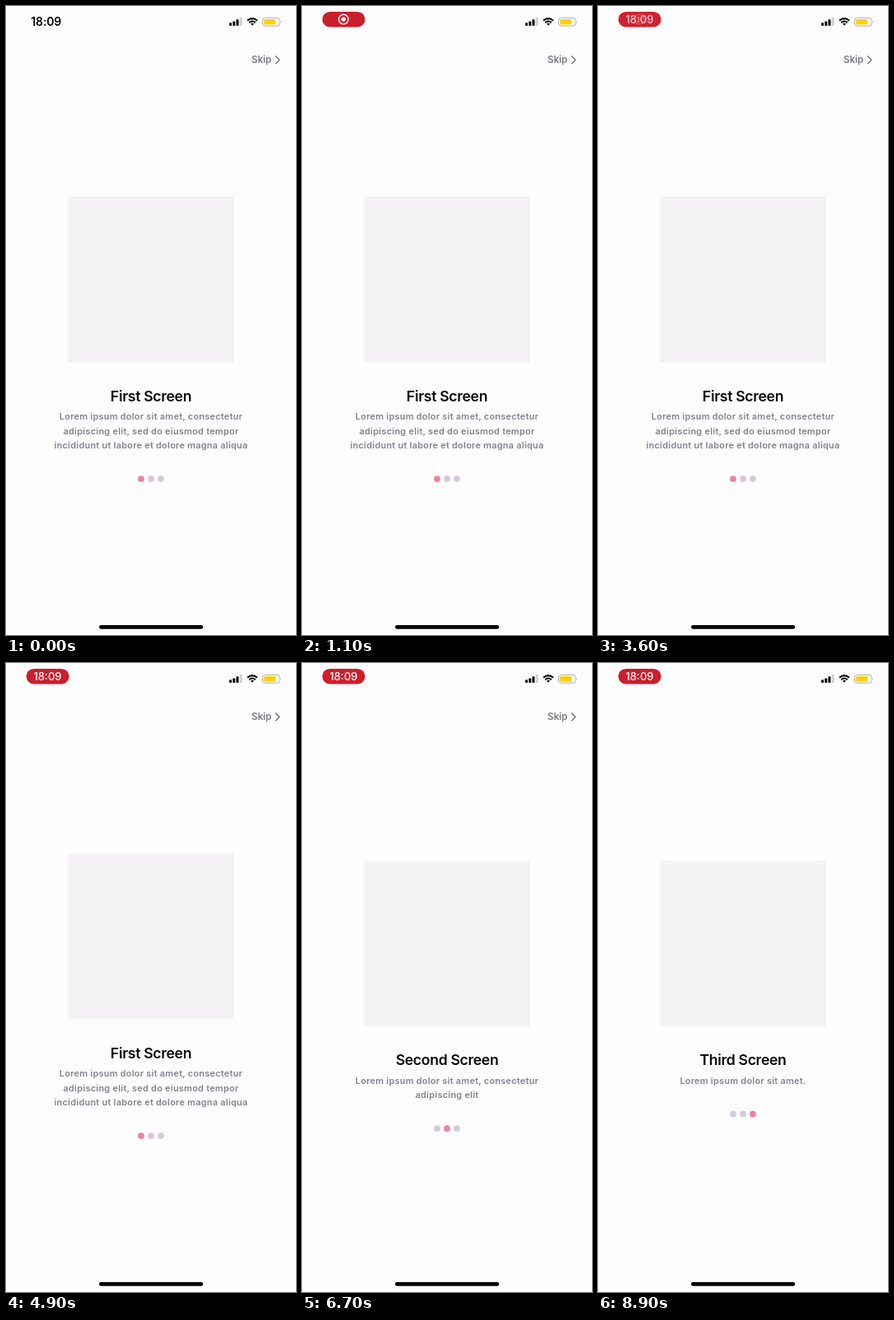
Write an HTML page that moves like this. It is 352 px wide and 762 px high and loops after 9100 ms.

```html
<!DOCTYPE html>
<html lang="en">
<head>
<meta charset="utf-8">
<title>Onboarding</title>
<style>
  html, body { margin: 0; width: 100%; height: 100%; overflow: hidden; background: #fefdfe; }
  svg { display: block; width: 352px; height: 762px; font-family: Inter, sans-serif; }
  .title { font-size: 17.6px; font-weight: 600; letter-spacing: -.32px; fill: #09090c; }
  .body { font-size: 10.9px; font-weight: 600; letter-spacing: .27px; fill: #828193; }
  .middle { text-anchor: middle; }
</style>
</head>
<body>
<svg viewBox="0 0 352 762">
  <text id="clock" x="30.3" y="24" font-size="14" font-weight="600" letter-spacing="-.15">18:09</text>
  <g id="pill">
    <rect id="pillShape" x="24.6" y="6.9" width="52" height="18.5" rx="9.25"/>
    <g id="record" fill="#fff">
      <circle cx="50.4" cy="16.1" r="5.8" fill="none" stroke="#fff" stroke-width="1.4"/>
      <circle cx="50.4" cy="16.1" r="2.7"/>
    </g>
    <text id="pillTime" class="middle" x="50.5" y="20.8" font-size="13" font-weight="500" fill="#fff">18:09</text>
  </g>

  <g fill="#09090b">
    <rect x="271" y="20.2" width="3" height="3.8" rx=".8"/>
    <rect x="275.2" y="18.4" width="3" height="5.6" rx=".8"/>
    <rect x="279.4" y="16.2" width="3" height="7.8" rx=".8"/>
    <rect x="283.6" y="14" width="3" height="10" rx=".8" fill="#cfced1"/>
  </g>
  <g fill="none" stroke="#09090b" stroke-width="2.1">
    <path d="M293 17.8Q299 12.4 305 17.8M295.2 20.2Q299 16.8 302.8 20.2"/>
    <path d="M297 21.6Q299 20 301 21.6L299 23.8Z" fill="#09090b" stroke="none"/>
  </g>
  <rect x="311.5" y="14.4" width="20.6" height="9.8" rx="3" fill="none" stroke="#aeadb0"/>
  <rect x="313.1" y="16" width="14.2" height="6.6" rx="1.6" fill="#fdd00b"/>
  <path d="M333.1 17.6q1.5 1.7 0 3.4z" fill="#aeadb0"/>

  <g id="skip" fill="#7b7a84">
    <text x="298" y="69.4" font-size="11.5" font-weight="600">Skip</text>
    <path d="M327.6 60.9l4.3 4.4-4.3 4.4" fill="none" stroke="#777680" stroke-width="1.5" stroke-linecap="round" stroke-linejoin="round"/>
  </g>

  <g id="pages"></g>
  <rect x="113" y="750.1" width="126.2" height="4.6" rx="2.3" fill="#050507"/>
</svg>
<script>
const LOOP = 9100;
const LINE = 17.5;
const pages = [
  { start: 0, top: 231, title: "First Screen", lines: [
    "Lorem ipsum dolor sit amet, consectetur",
    "adipiscing elit, sed do eiusmod tempor",
    "incididunt ut labore et dolore magna aliqua"] },
  { start: 5500, top: 239.6, title: "Second Screen", lines: [
    "Lorem ipsum dolor sit amet, consectetur",
    "adipiscing elit"] },
  { start: 7100, top: 239.6, title: "Third Screen", lines: ["Lorem ipsum dolor sit amet."] }
];
const el = id => document.getElementById(id);
const text = (kind, y, content) => `<text class="${kind} middle" x="176" y="${y}">${content}</text>`;

el("pages").innerHTML = pages.map(({ top, title, lines }, active) => {
  const dotsY = top + 289.3 + LINE * lines.length;
  const dots = pages.map((_, i) =>
    `<circle cx="${164 + 12 * i}" cy="${dotsY}" r="3.9" fill="${i === active ? "#ea839f" : "#d4cadf"}"/>`);
  return `<g><rect x="75.4" y="${top}" width="201.3" height="200.8" fill="#f4f2f5"/>` +
    text("title", top + 247.5, title) +
    lines.map((line, i) => text("body", top + 270.3 + LINE * i, line)).join("") +
    dots.join("") + "</g>";
}).join("");
const groups = [...el("pages").children];

const ease = (t, from, to) => {
  const p = Math.min(1, Math.max(0, (t - from) / (to - from)));
  return p * p * (3 - 2 * p);
};

function draw(now) {
  const t = now % LOOP;
  const current = pages.findLastIndex(page => t >= page.start);
  groups.forEach((g, i) => g.style.display = i === current ? "" : "none");
  el("skip").style.display = current === 2 ? "none" : "";

  const shown = ease(t, 50, 500);
  const toTime = ease(t, 3250, 3750);
  el("clock").style.opacity = 1 - shown;
  el("pill").style.opacity = shown;
  el("record").style.opacity = 1 - toTime;
  el("pillTime").style.opacity = toTime;

  // The recording pill breathes slightly between two reds.
  const glow = (1 - Math.cos((t - 1150) / 1950 * 2 * Math.PI)) / 2;
  el("pillShape").setAttribute("fill", `rgb(${203 + 14 * glow},${30 + 5 * glow},${43 + 5 * glow})`);
  requestAnimationFrame(draw);
}
requestAnimationFrame(draw);
</script>
</body>
</html>
```
